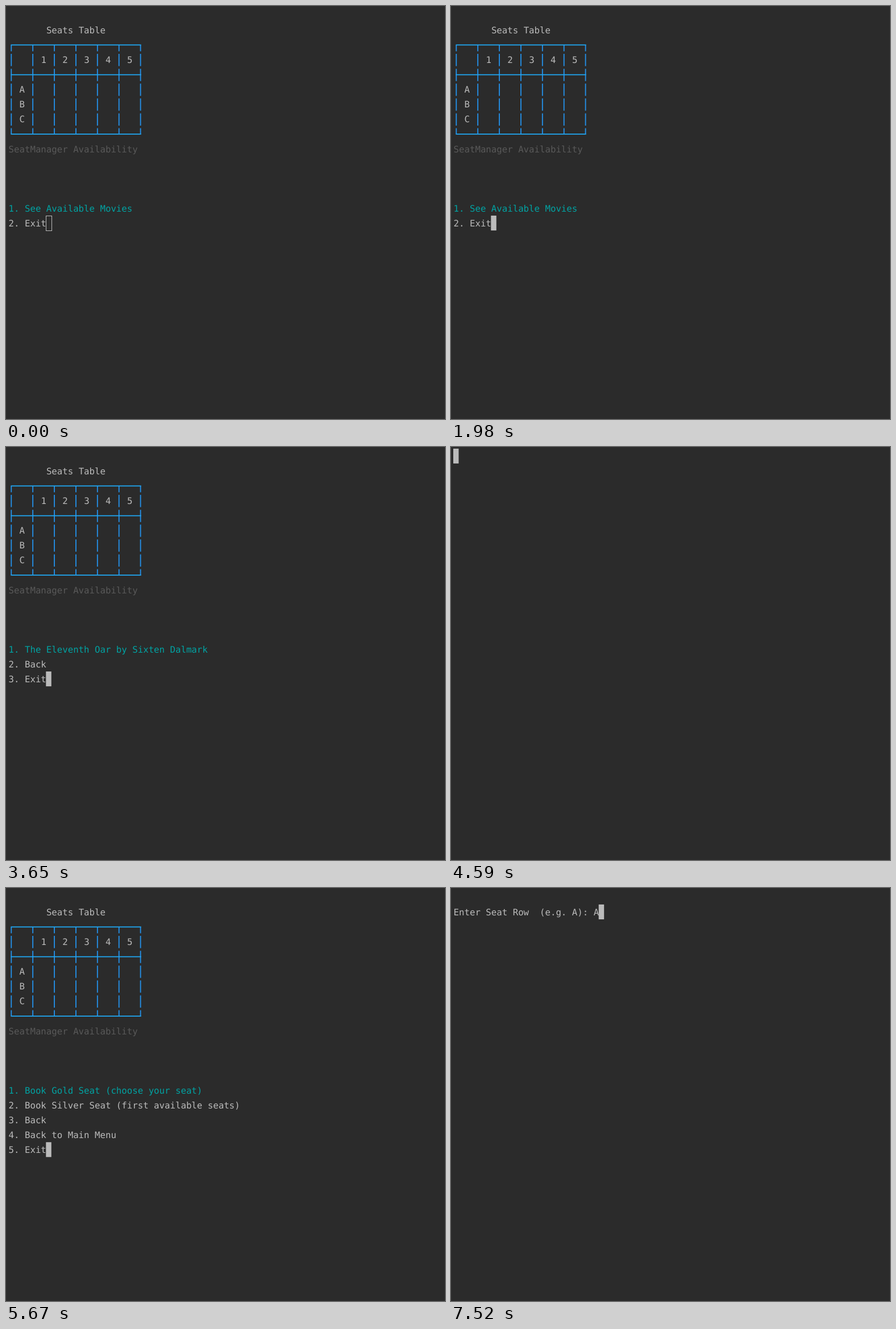
Write an HTML page that moves like this. It is 772x725 px and loops after 8000 ms.

```html
<!DOCTYPE html>
<html lang="en">
<head>
<meta charset="utf-8">
<title>Seat booking terminal</title>
<style>
  html, body { margin: 0; width: 100%; height: 100%; overflow: hidden; background: #2b2b2b; }
  svg { display: block; width: 772px; height: 725px; }
  text {
    font: 15.73px "DejaVu Sans Mono", "Noto Sans Mono", monospace;
    white-space: pre;
    text-rendering: geometricPrecision;
  }
</style>
</head>
<body>
<svg id="stage" viewBox="0 0 772 725"></svg>
<script>
const LOOP = 8000;
const CELL = 9.47, LINE = 26.08, LEFT = 4, TOP = 2.85;
const GRAY = "#bbbbbb", DIM = "#595959", TEAL = "#00a3a3";
const stage = document.getElementById("stage");

const colX = col => LEFT + col * CELL;
const rowY = row => TOP + row * LINE;

const print = (row, col, str, color = GRAY) =>
  `<text x="${colX(col) + 0.6}" y="${rowY(row) + 19}" fill="${color}">${str}</text>`;

function cursor(row, col, mode) {
  if (mode === "off") return "";
  if (mode === "hollow") {
    const x = Math.round(colX(col)) + 0.5, y = Math.round(rowY(row)) + 0.5;
    return `<rect x="${x}" y="${y}" width="10" height="26" fill="none" stroke="${GRAY}"/>`;
  }
  return `<rect x="${colX(col)}" y="${rowY(row)}" width="${CELL}" height="${LINE}" fill="${GRAY}"/>`;
}

function seatTable() {
  const ruleY = row => rowY(row) + 13.4;
  let rules = "", bars = "";
  for (const row of [2, 4, 8]) rules += `M8.5 ${ruleY(row)}H237.6`;
  for (let col = 0; col <= 24; col += 4) {
    for (let row = 2; row <= 8; row++) {
      const from = row === 2 ? ruleY(row) : rowY(row) + 3;
      const to = row === 8 ? ruleY(row) : rowY(row) + 24.5;
      bars += `M${colX(col) + 5.3} ${from}V${to}`;
    }
  }
  return `<path d="${bars}" stroke="#2492ec" stroke-width="1.8"/>` +
    `<path d="${rules}" stroke="#1fa8f4" stroke-width="1.8"/>` +
    print(1, 7, "Seats Table") +
    [1, 2, 3, 4, 5].map(n => print(3, 2 + n * 4, n)).join("") +
    [..."ABC"].map((name, i) => print(5 + i, 2, name)).join("") +
    print(9, 0, "SeatManager Availability", DIM);
}

const table = seatTable();

// Numbered menu under the table; the cursor rests after the last entry.
function menu(items, mode = "on", selected = 0) {
  const lines = items.map((item, i) => `${i + 1}. ${item}`);
  const last = lines.length - 1;
  return table +
    lines.map((line, i) => print(13 + i, 0, line, i === selected ? TEAL : GRAY)).join("") +
    cursor(13 + last, lines[last].length, mode);
}

function prompt(mode = "on", typed = "") {
  const line = "Enter Seat Row  (e.g. A): " + typed;
  return print(1, 0, line) + cursor(1, line.length, mode);
}

const home = ["See Available Movies", "Exit"];
const movies = ["The Eleventh Oar by Sixten Dalmark", "Back", "Exit"];
const booking = [
  "Book Gold Seat (choose your seat)",
  "Book Silver Seat (first available seats)",
  "Back", "Back to Main Menu", "Exit"
];

// [start in ms, screen]
const scenes = [
  [0, menu(home, "hollow")],
  [990, menu(home)],
  [1520, menu(home, "off")],
  [1980, menu(home)],
  [2400, menu(home, "on", 1)],
  [2860, menu(home)],
  [3390, menu(home, "off")],
  [3650, menu(movies)],
  [4590, cursor(0, 0, "on")],
  [4660, menu(booking)],
  [5130, menu(booking, "off")],
  [5670, menu(booking)],
  [5800, prompt()],
  [6260, prompt("off")],
  [6790, prompt()],
  [7320, prompt("off")],
  [7520, prompt("on", "A")]
];

let shown;
const start = performance.now();

function frame() {
  const t = (performance.now() - start) % LOOP;
  const scene = scenes.findLast(([from]) => from <= t);
  if (scene !== shown) {
    shown = scene;
    stage.innerHTML = scene[1];
  }
  requestAnimationFrame(frame);
}
frame();
</script>
</body>
</html>
```
